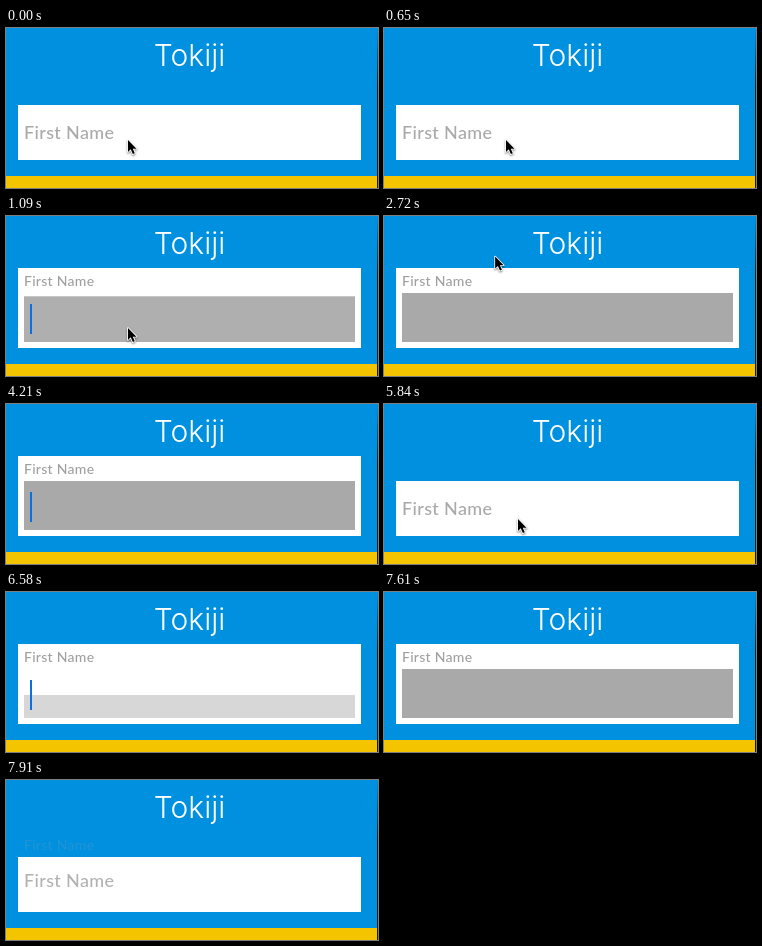
An HTML page with a canvas that plays this animation: 372x160 px, repeating every 8 s.

```html
<!DOCTYPE html>
<html lang="en">
<head>
<meta charset="utf-8">
<title>Floating label field</title>
<style>
  html, body { margin: 0; width: 100%; height: 100%; overflow: hidden; background: #0090e0; }
  canvas { display: block; }
</style>
</head>
<body>
<canvas id="stage" width="372" height="160"></canvas>
<script>
const ctx = document.getElementById('stage').getContext('2d');
const LOOP = 8000;
const STEP = 148;

const events = [
  { at: 805, focus: true },
  { at: 4752, focus: false },
  { at: 6398, focus: true },
  { at: 7642, focus: false }
];

// Where the pointer travels, and when
const pointerStart = { x: 122, y: 112 };
const moves = [
  { from: 2000, to: 2900, x: 110, y: 33 },
  { from: 3500, to: 4200, x: 152, y: 185 },
  { from: 4750, to: 4948, x: 193, y: 112 },
  { from: 4950, to: 5700, x: 134, y: 115 },
  { from: 6130, to: 6560, x: 148, y: 180 }
];

const arrow = new Path2D('M0 0V14L3.2 11L5.7 16.5L8 15.5L5.6 10.2H10Z');

const clamp = v => Math.max(0, Math.min(1, v));
const lerp = (a, b, p) => a + (b - a) * p;
const easeOut = (p, power) => 1 - (1 - clamp(p)) ** power;
const easeInOut = p => clamp(p) ** 2 * (3 - 2 * clamp(p));

function fieldState(t) {
  const event = events.filter(e => e.at <= t).pop();
  if (!event) return { open: 0, label: 0, fill: 0, caret: 0 };
  const dt = t - event.at;
  const moved = easeOut(dt / 200, 3);
  if (event.focus) {
    return { open: moved, label: moved, fill: easeOut((dt - 110) / 250, 2), caret: caretAlpha(dt) };
  }
  return { open: 1 - moved, label: 1 - easeOut(dt / 500, 3), fill: 1 - moved, caret: 0 };
}

// Solid after focus, then blinking with a short fade-out
function caretAlpha(dt) {
  const period = 980, firstOff = 925, hidden = 390, fade = 120;
  const phase = (dt + period - firstOff) % period;
  const lit = dt < firstOff ? dt >= 110 : phase >= hidden;
  return lit ? clamp((period - phase) / fade) : 0;
}

function pointerAt(t) {
  return moves.reduce((pos, move) => {
    const p = easeInOut((t - move.from) / (move.to - move.from));
    return { x: lerp(pos.x, move.x, p), y: lerp(pos.y, move.y, p) };
  }, pointerStart);
}

function rect(color, x, y, w, h) {
  ctx.fillStyle = color;
  ctx.fillRect(x, y, w, h);
}

function text(str, font, color, x, y, alpha = 1) {
  ctx.globalAlpha = alpha;
  ctx.font = font;
  ctx.fillStyle = color;
  ctx.fillText(str, x, y);
  ctx.globalAlpha = 1;
}

function placeholder(size, color, y, alpha) {
  ctx.textAlign = 'left';
  ctx.letterSpacing = `${size * 0.02}px`;
  text('First Name', `500 ${size}px Lato, sans-serif`, color, 18, y, alpha);
  ctx.letterSpacing = '0px';
}

function drawPointer({ x, y }) {
  ctx.save();
  ctx.translate(x, y);
  ctx.scale(0.85, 0.85);
  ctx.lineWidth = 2;
  ctx.lineJoin = 'round';
  ctx.strokeStyle = '#fff';
  ctx.shadowColor = 'rgba(0, 0, 0, 0.5)';
  ctx.shadowBlur = 2;
  ctx.shadowOffsetY = 1;
  ctx.stroke(arrow);
  ctx.shadowColor = 'transparent';
  ctx.fillStyle = '#000';
  ctx.fill(arrow);
  ctx.restore();
}

function drawBackground() {
  rect('#0090e0', 0, 0, 372, 160);
  rect('#f5c400', 0, 148, 372, 12);
  // Slightly slanted dark edge on the right
  ctx.fillStyle = '#1a1a1a';
  ctx.fill(new Path2D('M372 0L371 60V160H372Z'));
  ctx.textAlign = 'center';
  text('Tokiji', '300 30px Inter, Roboto, sans-serif', '#fff', 183.5, 38);
}

function draw(t) {
  const { open, label, fill, caret } = fieldState(t);
  drawBackground();

  const top = lerp(77, 52, open);
  rect('#fff', 12, top, 343, 132 - top);
  const shade = Math.round(lerp(255, 169, fill));
  rect(`rgb(${shade},${shade},${shade})`, 18, lerp(126, 77, fill), 331, 49 * fill);

  placeholder(18, '#a9a9a9', lerp(111, 70, label), 1 - label);
  placeholder(14, '#a0a0a0', 70, label ** 0.7);

  ctx.globalAlpha = caret;
  rect('#0873de', 24, 88, 2, 30);
  ctx.globalAlpha = 1;

  drawPointer(pointerAt(t));
}

// The picture advances in coarse, even steps
function frame(now) {
  const tick = 360 + STEP * Math.floor((now % LOOP - 345) / STEP);
  draw(Math.max(0, tick));
  requestAnimationFrame(frame);
}
requestAnimationFrame(frame);
</script>
</body>
</html>
```
